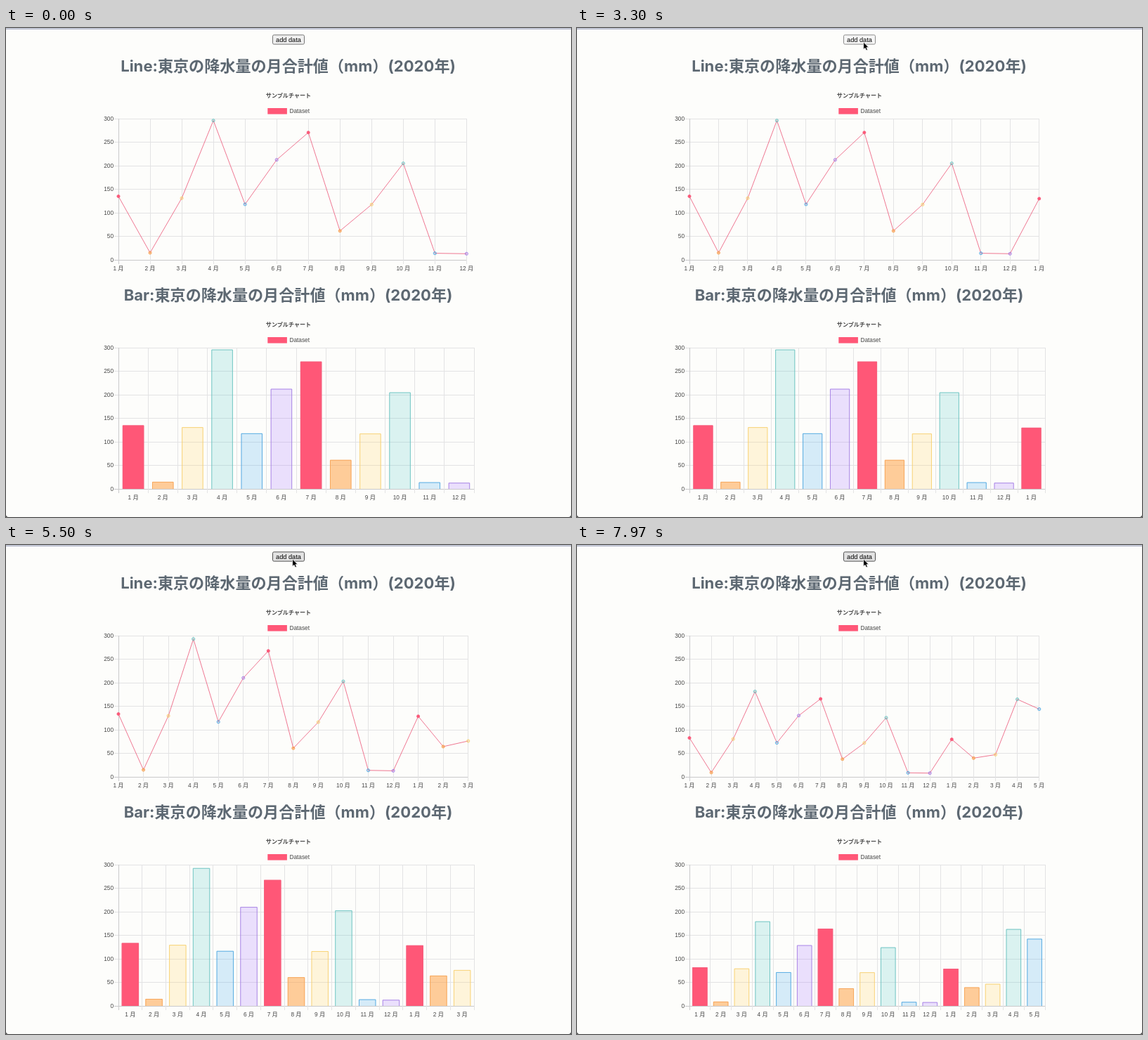
These frames come from a looping animation (804 by 696 pixels, 8000 ms). An HTML page:

```html
<!DOCTYPE html>
<html lang="ja">
<head>
<meta charset="utf-8">
<title>Rainfall charts</title>
<style>
  html, body { margin: 0; width: 100%; height: 100%; overflow: hidden; background: #fdfdfb; }
  svg { display: block; width: 804px; height: 696px; }
  text { font: 8.3px "Liberation Sans", "Noto Sans CJK JP", "Noto Sans CJK", sans-serif; fill: #484848; }
  .mid { text-anchor: middle; }
  .end { text-anchor: end; }
  .head {
    font: bold 22.1px Inter, "Noto Sans CJK JP", "Noto Sans CJK", sans-serif;
    font-feature-settings: "calt" 0;
    fill: #5d6872;
  }
  .sub { font-size: 8.1px; font-weight: bold; }
  .btn { font-size: 9.2px; fill: #000; }
</style>
</head>
<body>
<svg viewBox="0 0 804 696">
  <rect width="804" height="696" fill="#fdfdfb"/>
  <rect width="804" height="1" fill="#d3d6e0"/>
  <rect y="1" width="804" height="1" fill="#a9aec4"/>
  <path d="M0 692.5Q0 696 3.5 696H0ZM804 692.5Q804 696 800.5 696H804Z" fill="#222"/>
  <rect id="button" x="379.5" y="9.9" width="45" height="13.2" rx="1.8"/>
  <text class="mid btn" x="402" y="19.7">add data</text>
  <g id="line"></g>
  <g id="bar"></g>
  <path id="cursor" d="M0 0V10.6L2.4 8.4L4 12L5.9 11.2L4.4 7.7H7.6Z" fill="#000" stroke="#fff" stroke-width=".8"/>
</svg>
<script>
const LOOP = 8000, DURATION = 1000, PRESS = 90, BAR_DELAY = 3;
const LEFT = 160, RIGHT = 666, UNIT = 0.67, SIZE = 8.3;
const rain = [135, 15, 131, 296, 118, 212.5, 270.5, 61.5, 117.5, 205, 14, 13, 130, 65, 77, 269, 235];
const clicks = [1915, 3326, 4822, 6349, 7760];
const RED = '#ff5777';
const palette = [
  [RED, 1, '#f4607e'], ['#ff9f40', .52, '#f6a355'], ['#ffce56', .2, '#f8d06c'],
  ['#4bc0c0', .2, '#66c1bf'], ['#36a2eb', .2, '#4ba5e0'], ['#9966ff', .2, '#a37ce4']
];
const get = id => document.getElementById(id);
const snap = v => Math.floor(v) + .5;
const clamp = v => Math.min(1, Math.max(0, v));
const month = i => `${i % 12 + 1} 月`;

function text(x, y, str, cls) {
  return `<text x="${x}" y="${y}" class="${cls}">${str}</text>`;
}

function rule(x1, y1, x2, y2, strong) {
  return `<path d="M${x1} ${y1}L${x2} ${y2}" stroke="${strong ? '#c9c9cb' : '#e3e3e4'}"/>`;
}

function frame(name, top, right) {
  const base = top + 201;
  let out = text(401.5, top - 67.4, `${name}:東京の降水量の月合計値（mm）(2020年)`, 'mid head')
    + text(402, top - 30, 'サンプルチャート', 'mid sub')
    + `<rect x="372.3" y="${top - 15}" width="27.6" height="8.6" fill="${RED}"/>`
    + text(403.4, top - 7.9, 'Dataset', '');
  for (let v = 0; v <= 300; v += 50) {
    const y = base - v * UNIT;
    out += rule(154, snap(y), right, snap(y), v === 0) + text(153, y + 2.8, v, 'end');
  }
  return out;
}

function lineChart(n, grow) {
  const top = 129, base = 330;
  const lastWidth = SIZE * (n % 12 === 0 ? 2.39 : 1.83);
  const right = RIGHT - lastWidth / 2 - .7;
  const step = (right - LEFT) / (n - 1);
  let grid = '', dots = '', path = '';
  for (let i = 0; i < n; i++) {
    const x = LEFT + i * step, y = base - rain[i] * UNIT * grow;
    const [fill, alpha, edge] = palette[i % 6];
    grid += rule(snap(x), top, snap(x), 336, i === 0) + text(x, 345.2, month(i), 'mid');
    path += `${i ? 'L' : 'M'}${x} ${y}`;
    dots += `<circle cx="${x}" cy="${y}" r="2.05" fill="${fill}" fill-opacity="${alpha}" stroke="${edge}" stroke-width=".9"/>`;
  }
  return frame('Line', top, right) + grid
    + `<path d="${path}" fill="none" stroke="#ec5f7f" stroke-width=".85"/>` + dots;
}

function barChart(n, grow) {
  const top = 455, base = 656, step = (RIGHT - LEFT) / n, w = step * .72;
  let grid = rule(snap(RIGHT), top, snap(RIGHT), 662), bars = '';
  for (let i = 0; i < n; i++) {
    const x = LEFT + i * step, mid = x + step / 2;
    const h = rain[i] * UNIT * grow, l = mid - w / 2, y = base - h;
    const [fill, alpha, edge] = palette[i % 6];
    grid += rule(snap(x), top, snap(x), 662, i === 0) + text(mid, 671.2, month(i), 'mid');
    bars += `<rect x="${l}" y="${y}" width="${w}" height="${h}" fill="${fill}" fill-opacity="${alpha}"/>`
      + `<path d="M${l + .4} ${base}V${y + .4}H${l + w - .4}V${base}" fill="none" stroke="${edge}" stroke-width=".9"/>`;
  }
  return frame('Bar', top, RIGHT) + grid + bars;
}

const ease = p => 1 - (1 - clamp(p)) ** 4;
let last = '';

function drawCharts(t) {
  const done = clicks.filter(c => t >= c - 8).length;
  const start = done ? clicks[done - 1] : -2 * DURATION;
  const a = ease((t - start) / DURATION), b = ease((t - start - BAR_DELAY) / DURATION);
  const key = `${done} ${a} ${b}`;
  if (key === last) return;
  last = key;
  get('line').innerHTML = lineChart(12 + done, a);
  get('bar').innerHTML = barChart(12 + done, b);
}

function drawPointer(t) {
  const p = clamp((t - 650) / 450), k = 1 - (1 - p) ** 2;
  get('cursor').setAttribute('transform', `translate(${375 + 32.6 * k} ${-14 + 34 * k})`);
  const hover = p > .75;
  const pressed = clicks.some(c => t >= c - PRESS && t < c - 8);
  const [fill, edge] = pressed ? ['#f5f5f5', '#8d8d8d'] : hover ? ['#e2e2e2', '#4f4f4f'] : ['#efefef', '#767676'];
  get('button').setAttribute('fill', fill);
  get('button').setAttribute('stroke', edge);
}

function tick() {
  const t = performance.now() % LOOP;
  drawCharts(t);
  drawPointer(t);
  requestAnimationFrame(tick);
}
tick();
</script>
</body>
</html>
```
